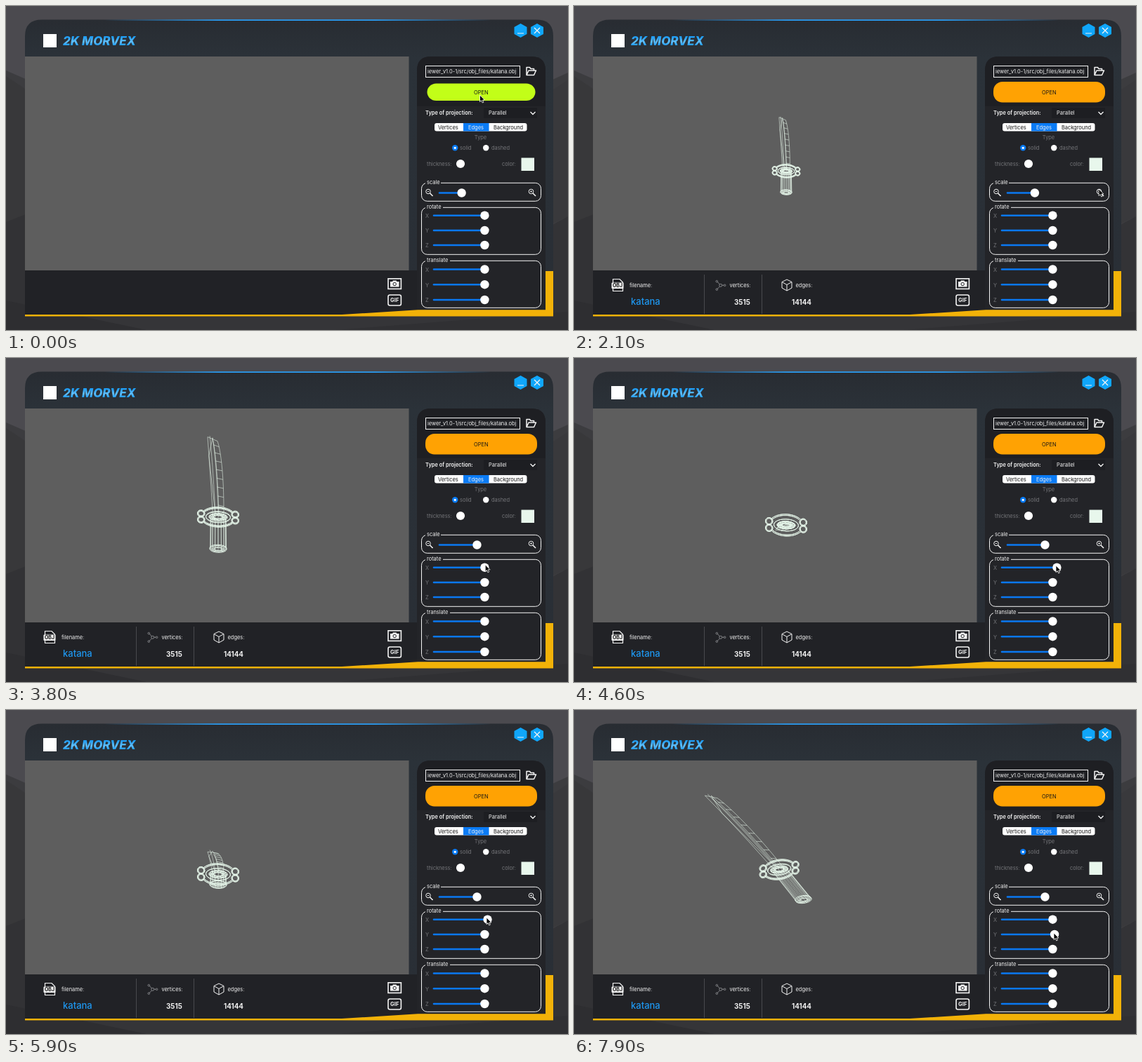
Animation of 800x462 px, one loop 8 s. Source, as an HTML page:

```html
<!DOCTYPE html>
<html lang="en">
<head>
<meta charset="utf-8">
<title>Model viewer</title>
<style>
html, body { margin: 0; width: 100%; height: 100%; overflow: hidden; background: #3a3a3d; }
svg { display: block; width: 800px; height: 462px; font: 7.45px Inter, "Liberation Sans", sans-serif; }
text { fill: #f2f2f2; }
.dim { fill: #747579; }
.dark { fill: #161616; }
.mid { text-anchor: middle; }
.bold { font-weight: 600; }
.num { font-size: 9.8px; font-weight: 700; }
.line { fill: none; stroke: #f4f4f4; }
.track { stroke: #0a78f2; stroke-width: 2.6; stroke-linecap: round; }
.thumb { fill: #fff; }
#title { font-size: 17px; font-weight: 800; font-style: italic; fill: url(#ink); }
#model path { fill: none; stroke: #e6f6ea; stroke-linejoin: round; }
</style>
</head>
<body>
<svg viewBox="0 0 800 462">
  <defs>
    <linearGradient id="head" x1="0" y1="0" x2="0" y2="1">
      <stop offset="0" stop-color="#282c32"/><stop offset=".13" stop-color="#2b3239"/>
      <stop offset="1" stop-color="#292e35"/>
    </linearGradient>
    <linearGradient id="glow">
      <stop offset="0" stop-color="#2a9df4" stop-opacity="0"/><stop offset=".3" stop-color="#2a9df4"/>
      <stop offset=".7" stop-color="#2a9df4"/><stop offset="1" stop-color="#2a9df4" stop-opacity="0"/>
    </linearGradient>
    <linearGradient id="ink" x1="0" y1="0" x2="0" y2="1">
      <stop offset=".2" stop-color="#1d9cf5"/><stop offset=".55" stop-color="#63c0fb"/>
      <stop offset=".8" stop-color="#1d9cf5"/>
    </linearGradient>
    <g id="lens" fill="none" stroke="#f4f4f4">
      <circle cx="-1.5" cy="-1.5" r="3.3"/><path d="M1 1L5 5" stroke-width="1.6"/>
    </g>
    <path id="hex" d="M0-10L9-5V5L0 10L-9 5V-5Z" fill="#10a6fa"/>
  </defs>

  <!-- backdrop -->
  <rect width="800" height="462" fill="#3c3c3f"/>
  <path d="M0 0H800V95L778 105H30L0 92Z" fill="#4b4a4f"/>
  <path d="M0 100L30 120V300L0 310Z" fill="#38383a"/>
  <path d="M0 308L30 296V462H0Z" fill="#323235"/>
  <path d="M778 120L800 105V300L778 310Z" fill="#39393c"/>
  <path d="M778 312L800 300V462H778Z" fill="#333336"/>
  <path d="M0 440H800V462H0Z" fill="#353538"/>
  <path d="M0 420L200 462H0Z" fill="#2e2e31"/>
  <path d="M470 462L800 436V462Z" fill="#303033"/>

  <!-- window -->
  <path d="M27 441V43Q27 19.5 51 19.5H755Q779 19.5 779 43V441Z" fill="url(#head)"/>
  <path d="M140 19.2H690V21H140Z" fill="url(#glow)"/>
  <rect x="27" y="377" width="559" height="64" fill="#212226"/>
  <rect x="27" y="72" width="546.5" height="305" fill="#5e5e5e"/>
  <path d="M585 433V92Q585 72 605 72H748Q768 72 768 92V433Z" fill="#232428"/>
  <path d="M585 143V92Q585 72 605 72H748Q768 72 768 92V143Z" fill="#1e1f23"/>
  <path d="M27 440H478L586 433.3H768V378H779V442.5H27Z" fill="#f2b208"/>

  <rect x="53" y="40" width="19" height="19" fill="#fff"/>
  <text id="title" x="81" y="56">2K MORVEX</text>
  <use href="#hex" x="732.5" y="35"/><use href="#hex" x="756" y="35"/>
  <path class="line" d="M728 39H737M752 31L760 39M760 31L752 39" stroke-width="1.2"/>

  <!-- file and options -->
  <rect class="line" x="597.5" y="85.5" width="134" height="16"/>
  <text x="600" y="96.2">iewer_v1.0-1/src/obj_files/katana.obj</text>
  <path class="line" d="M741 98.5V87.5H745.5L747 89.5H751.5V92M741 98.5L744 92H754.5L751.5 98.5Z" stroke-width="1.5" stroke-linejoin="round"/>
  <rect id="open"/>
  <text class="mid dark" x="676.3" y="126">OPEN</text>
  <text class="bold" x="597" y="154.7">Type of projection:</text>
  <rect x="680" y="145" width="76" height="15" fill="#1d1e22"/>
  <text x="687" y="154.7">Parallel</text>
  <path class="line" d="M746.5 151L750 154.5L753.5 151" stroke-width="1.4"/>
  <rect x="610" y="167" width="131.5" height="11.5" rx="3" fill="#fff"/>
  <rect x="651" y="167" width="36.5" height="11.5" fill="#0a7bf5"/>
  <text class="mid dark" x="629.3" y="175.6">Vertices</text>
  <text class="mid" x="669" y="175.6">Edges</text>
  <text class="mid dark" x="715" y="175.6">Background</text>
  <text class="mid dim" x="675.5" y="189.5">Type</text>
  <circle cx="639.2" cy="202.3" r="4.2" fill="#0a7bf5"/><circle cx="639.2" cy="202.3" r="1.6" fill="#fff"/>
  <text class="dim" x="646" y="205">solid</text>
  <circle cx="683.2" cy="202.3" r="4.2" fill="#fff"/>
  <text class="dim" x="691" y="205">dashed</text>
  <text class="dim" x="599" y="228.3">thickness:</text>
  <circle class="thumb" cx="647" cy="225" r="6.1"/>
  <text class="dim" x="706" y="227.6">color:</text>
  <rect x="733.5" y="216.5" width="18.5" height="18.5" fill="#e8f7ec"/>

  <g id="groups"></g>
  <use href="#lens" x="602.5" y="266"/><use href="#lens" x="749" y="266"/>
  <path d="M599.6 264.5H602.4M746.1 264.5H748.9M747.5 263.1V265.9" stroke="#f4f4f4" stroke-width=".8"/>
  <g id="sliders"></g>

  <!-- footer -->
  <g class="line" stroke-width="1.6">
    <rect x="544" y="388.8" width="18.4" height="14.6"/>
    <rect x="544" y="412" width="18.4" height="15" rx="2.5"/>
  </g>
  <path d="M547 393H550L551 391.5H555.4L556.4 393H559.5V400.5H547Z" fill="#f4f4f4"/>
  <circle cx="553.2" cy="396.5" r="2.2" fill="#f4f4f4" stroke="#212226"/>
  <text class="mid num" x="553.2" y="422.4" style="font-size:7.6px">GIF</text>
  <g id="info">
    <path class="line" d="M55.5 395V389.5H65L69.5 394V406.5H55.5V403" stroke-width="1.2"/>
    <rect x="53.5" y="394.5" width="17" height="8.5" rx="1" fill="#f4f4f4"/>
    <text class="mid dark num" x="62" y="401.4" style="font-size:7px">OBJ</text>
    <text x="79" y="401">filename:</text>
    <text x="81" y="426" style="font-size:13px;font-weight:500;fill:#1e96ee">katana</text>
    <path d="M185.5 383V439M267.5 383V439" stroke="#48494d"/>
    <g fill="none" stroke="#8d8e91" stroke-width=".9">
      <path d="M204 393L207.5 397M210.5 398.2H213.5M207.5 400L204 403.5"/>
      <circle cx="208.8" cy="398.3" r="2"/><circle cx="203.3" cy="392.6" r="1.3"/>
      <circle cx="214.6" cy="398.3" r="1.3"/><circle cx="203.3" cy="404.2" r="1.3"/>
    </g>
    <text x="221.5" y="401">vertices:</text>
    <text class="num" x="228" y="426">3515</text>
    <path class="line" d="M303 390L310 393.5V402L303 406L296 402V393.5ZM296 393.5L303 397.5L310 393.5M303 397.5V406"/>
    <text x="315.5" y="401">edges:</text>
    <text class="num" x="310" y="426">14144</text>
  </g>

  <g id="model"><path id="blade" stroke-width=".75" opacity=".75"/><path id="guard" stroke-width="1"/></g>
  <path id="cursor" d="M0 0V9.6L2.2 7.6L3.7 11L5.4 10.2L3.9 7H6.9Z" fill="#000" stroke="#fff" stroke-width=".8"/>
</svg>
<script>
const LOOP = 8000, PIVOT = [302, 252.8], AXIS_Y = -14.5, ROLL = .035, RAD = Math.PI / 180;
const $ = id => document.getElementById(id);

// control groups: name, legend width, top, height
$('groups').innerHTML = [['scale', 18, 252, 26], ['rotate', 21, 287, 67], ['translate', 31, 363, 67]]
  .map(([name, w, y, h]) =>
    `<rect class="line" x="591.5" y="${y}.3" width="170" height="${h}" rx="8"/>
     <rect x="597" y="${y - 2}" width="${w + 4}" height="5" fill="#232428"/>
     <text x="599" y="${y + 2}">${name}</text>`).join('');

const slider = (id, y, from, label = '') =>
  `<text class="dim" x="597" y="${y + 3.4}">${label}</text>
   <path class="track" id="${id}Track" d="M${from} ${y}H681.4"/>
   <circle class="thumb" id="${id}" cx="681.4" cy="${y}" r="6.2"/>`;
$('sliders').innerHTML = slider('zoom', 266.5, 617) +
  [298.7, 320, 341].map((y, i) => slider('rot' + i, y, 609, 'XYZ'[i])).join('') +
  [375.5, 397.2, 419].map((y, i) => slider('move' + i, y, 609, 'XYZ'[i])).join('');

function setSlider(id, x) {
  const track = $(id + 'Track');
  $(id).setAttribute('cx', x);
  track.setAttribute('d', track.getAttribute('d').replace(/H.*/, 'H' + x));
}

// eased value at time t from [time, value] pairs
function tween(keys, t) {
  let i = 0;
  while (i < keys.length - 1 && t >= keys[i + 1][0]) i++;
  const [t0, v0] = keys[i], [t1, v1] = keys[i + 1] || [LOOP, v0];
  const k = Math.min(1, Math.max(0, (t - t0) / (t1 - t0)));
  return v0 + (v1 - v0) * k * k * (3 - 2 * k);
}

const range = (n, f) => Array.from({ length: n + 1 }, (_, i) => f(i / n, i));
const onAxis = (x, y, z) => [x, AXIS_Y + y + ROLL * x, z];
const arc = (cx, cy, rx, ry, z, a0 = 0, a1 = 360, n = 24) => range(n, k => {
  const a = (a0 + (a1 - a0) * k) * RAD;
  return onAxis(cx + rx * Math.cos(a), cy + ry * Math.sin(a), z);
});

// filled-looking patch of crossing edges
const mesh = (rx, ry, z) => range(26, (k, i) => {
  const a = k * 1440 * RAD, r = i % 2 ? 1 : .45;
  return onAxis(rx * r * Math.cos(a), ry * r * Math.sin(a), z);
});

function buildGuard() {
  const lines = [];
  for (const z of [29, 31]) {
    for (const side of [-1, 1])
      for (const cy of [-4.8, 4.8])
        for (const r of [5.2, 4]) lines.push(arc(side * 24.3, cy, r, r, z));
    for (const a of [30, 210])
      for (const d of [0, 1.7]) lines.push(arc(0, 0, 25 - d, 15.6 - d, z, a, a + 120));
    lines.push(arc(0, 0, 17.5, 8.5, z), arc(0, 0, 13, 5.5, z));
  }
  lines.push(mesh(13, 5.5, 30));
  for (const z of [-76, -73]) lines.push(arc(0, 0, 12, 5.4, z));
  return lines;
}

// blade section at k from base (0) to tip (1); u runs across, lift is thickness
function bladePoint(k, u, lift) {
  const left = -7.5 - 7.5 * k, right = 8 - 9 * k ** 2.5;
  return [left + (right - left) * u, AXIS_Y + 7 * k * k + lift, 35 + 275 * k - 14 * u * k ** 8];
}

function buildBlade() {
  const rails = [[0, 0], [.22, -3], [.5, -2], [.55, 2], [1, 0]];
  const lines = rails.map(([u, h]) => range(14, k => bladePoint(k, u, h)));
  for (let i = 1; i <= 8; i++)
    lines.push([bladePoint(i / 9, .5, -2), bladePoint(i / 9, 1, 0)]);
  lines.push(range(1, k => bladePoint(1, k, 0)));
  lines.push([bladePoint(0, .22, -3), bladePoint(.75, 0, 0), bladePoint(1, .5, -2)]);
  const low = arc(0, 0, 11.5, 5, -72, 0, 360, 16), high = arc(0, 0, 11, 5, 24, 0, 360, 16);
  return lines.concat(low.map((p, i) => [p, high[i]]), [mesh(10.5, 4.5, -76)]);
}

const guard = buildGuard(), blade = buildBlade();

function project(lines, scale, a, b) {
  const ca = Math.cos(a), sa = Math.sin(a), cb = Math.cos(b), sb = Math.sin(b);
  return lines.map(line => 'M' + line.map(([x, y, z]) => {
    const px = x * cb - z * sb, depth = x * sb + z * cb;
    return (PIVOT[0] + px * scale).toFixed(2) + ' ' +
      (PIVOT[1] + (y * ca - depth * sa) * scale).toFixed(2);
  }).join('L')).join('');
}

const cursorX = [[0, 674.5], [700, 674.5], [1150, 731], [1300, 731], [1600, 747], [3400, 747],
  [3850, 680], [4050, 680], [4600, 686], [5100, 686], [5900, 684], [6300, 680], [6650, 680.5], [7200, 682.3], [7900, 683]];
const cursorY = [[0, 127], [700, 127], [1150, 281], [1300, 281], [1600, 261], [3400, 261],
  [3850, 296], [6300, 296], [6600, 318]];
const angleX = [[0, 25.5], [4050, 25.5], [4600, 0], [5100, 0], [5900, 8], [6300, 25.5]];
const angleY = [[0, 0], [6650, 0], [7200, 14.8], [7900, 19.1]];

function setButton(t) {
  const inset = t < 250 ? 2.5 : 0, open = $('open');
  const box = { x: 597 + inset, y: 108 + inset, width: 159 - 2 * inset, height: 29.5 - 2 * inset, rx: 13,
    fill: t < 800 ? '#c2fe18' : '#ffa203' };
  for (const key in box) open.setAttribute(key, box[key]);
}

function draw(now) {
  const t = now % LOOP;
  const clicks = Math.max(0, Math.min(9, Math.floor((t - 1500) / 200)));
  const scale = .55 * 1.0687 ** clicks;
  const a = tween(angleX, t), b = tween(angleY, t);
  const shown = t >= 500 ? 'visible' : 'hidden';

  setButton(t);
  setSlider('zoom', (648.6 + clicks * 2.43).toFixed(2));
  setSlider('rot0', (681.4 + (25.5 - a) * .235).toFixed(2));
  setSlider('rot1', (681.4 + b * .14).toFixed(2));
  $('model').setAttribute('visibility', shown);
  $('info').setAttribute('visibility', shown);
  $('blade').setAttribute('d', project(blade, scale, a * RAD, b * RAD));
  $('guard').setAttribute('d', project(guard, scale, a * RAD, b * RAD));
  $('cursor').setAttribute('transform', `translate(${tween(cursorX, t)} ${tween(cursorY, t)})`);
}

function frame() {
  draw(performance.now());
  requestAnimationFrame(frame);
}
frame();
</script>
</body>
</html>
```
